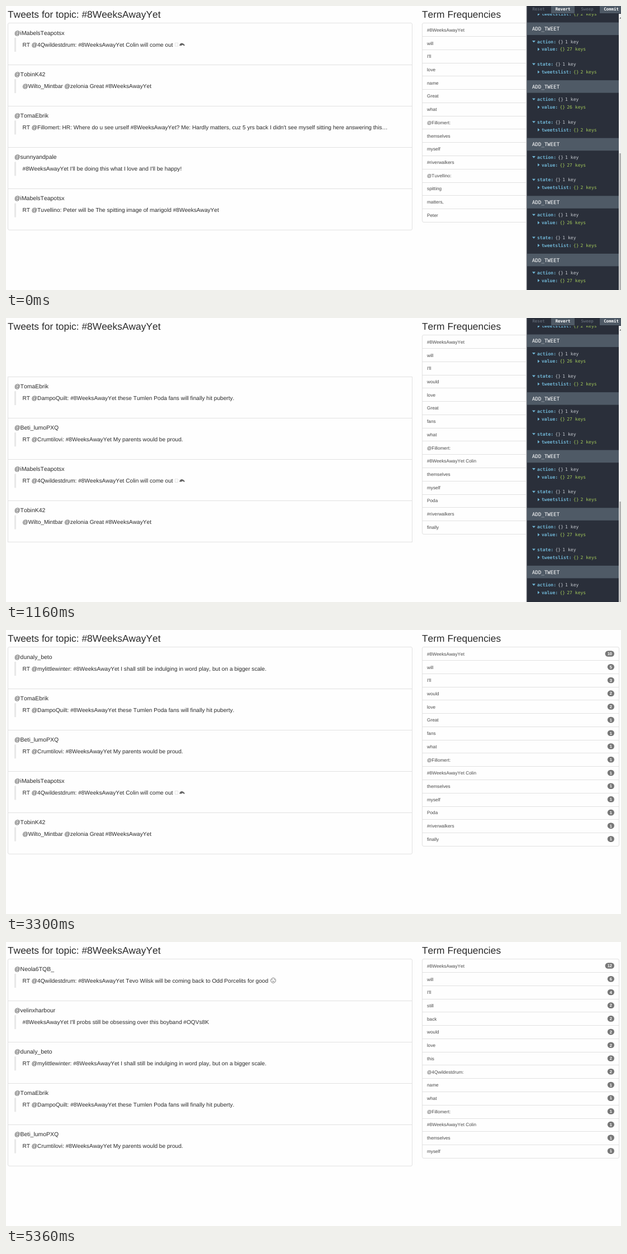
Write an HTML page that moves like this. It is 1100x509 px and loops after 8000 ms.

```html
<!DOCTYPE html>
<html lang="en">
<head>
<meta charset="utf-8">
<title>Topic stream</title>
<style>
  html, body { margin: 0; width: 100%; height: 100%; overflow: hidden; background: #fefefe; }
  svg { display: block; width: 1100px; height: 509px; }
  text { font-family: "Liberation Sans", Arial, sans-serif; font-kerning: none; fill: #2a2a2a; text-rendering: geometricPrecision; white-space: pre; }
  .title { font-size: 17.4px; }
  .user { font-size: 10.44px; }
  .body { font-size: 10.15px; }
  .term { font-size: 8.25px; fill: #484848; }
  .count { font-size: 7.5px; font-weight: bold; fill: #fff; text-anchor: middle; }
  .line { fill: none; stroke: #e1e1e1; }
  .log text { font-family: "DejaVu Sans Mono", monospace; font-size: 8.08px; }
  .log .head { font-size: 9.1px; fill: #fff; }
  .log .label { fill: #6fb3d2; font-weight: bold; }
  .log .open { fill: #c4c8ce; }
  .log .shut { fill: #a1c659; }
  .log .button { font-size: 7.4px; font-weight: bold; fill: #fff; text-anchor: middle; }
  .log .off { fill: #5a626e; }
</style>
</head>
<body>
<svg viewBox="0 0 1100 509">
  <text class="title" x="3" y="21" id="topic"></text>
  <text class="title" x="744" y="21">Term Frequencies</text>
  <g id="posts"></g>
  <g id="terms"></g>
  <g id="log" class="log"></g>
  <path id="cursor" d="M0 0V9.5L2.2 7.6L3.8 11L5.2 10.4L3.8 7H6.6Z" fill="#fff" stroke="#333" stroke-width=".8"/>
</svg>
<script>
const LOOP = 8000;
const TAG = "#8WeeksAwayYet";
const $ = id => document.getElementById(id);
const range = (n, draw) => Array.from({ length: n }, (_, i) => draw(i)).join("");
const label = (cls, x, y, s) => `<text class="${cls}" x="${x}" y="${y}">${s}</text>`;
const box = (x, y, w, h, fill) => `<rect x="${x}" y="${y}" width="${w}" height="${h}" fill="${fill}"/>`;

// Newest first: [user, message, icon]
const posts = [
  ["@Neola6TQB_", `RT @4Qwildestdrum: ${TAG} Tevo Wilsk will be coming back to Odd Porcelits for good`, "face"],
  ["@velinxharbour", `${TAG} I'll probs still be obsessing over this boyband #OQVs8K`],
  ["@dunaly_beto", `RT @mylittlewinter: ${TAG} I shall still be indulging in word play, but on a bigger scale.`],
  ["@TomaEbrik", `RT @DampoQuilt: ${TAG} these Tumlen Poda fans will finally hit puberty.`],
  ["@Beti_lumoPXQ", `RT @Crumtilovi: ${TAG} My parents would be proud.`],
  ["@iMabelsTeapotsx", `RT @4Qwildestdrum: ${TAG} Colin will come out`, "arch"],
  ["@TobinK42", `@Wilto_Mintbar @zelonia Great ${TAG}`],
  ["@TomaEbrik", `RT @Fillomert: HR: Where do u see urself ${TAG}? Me: Hardly matters, cuz 5 yrs back I didn't see myself sitting here answering this…`],
  ["@sunnyandpale", `${TAG} I'll be doing this what I love and I'll be happy!`],
  ["@iMabelsTeapotsx", `RT @Tuvellino: Peter will be The spitting image of marigold ${TAG}`]
];

const icons = {
  arch: `<rect x="302.5" y="-6.5" width="5" height="6" fill="none" stroke="#e4e4e4"/>
    <path d="M310 -1.5Q311 -6 314.5 -6Q318.5 -5.5 320 -1.5H317.5Q316 -4 314 -1.5Z" fill="#666"/>`,
  face: `<g fill="none" stroke="#555" stroke-width=".8"><circle cx="478" cy="-3.7" r="4.4"/>
    <path d="M475.4 -5.2H477M479 -5.2H480.6M476 -1.8Q478 -2.6 480 -1.8"/></g>`
};

const ranking = (names, counts) => ({ names: [TAG, "will", "I'll", ...names.split("|")], counts });
const latest = `@Fillomert:|${TAG} Colin|themselves|myself`;
const rankings = [
  ranking("love|name|Great|what|@Fillomert:|themselves|myself|#riverwalkers|@Tuvellino:|spitting|matters,|Peter", [8, 5, 3]),
  ranking(`would|love|name|what|${latest}|#riverwalkers|@Tuvellino:|spitting|matters,`, [8, 5, 3, 2, 2]),
  ranking(`would|love|Great|fans|what|${latest}|Poda|#riverwalkers|finally`, [10, 5, 3, 2, 2]),
  ranking(`still|would|love|this|name|what|${latest}|Poda|#riverwalkers`, [11, 5, 4, 2, 2, 2, 2]),
  ranking(`still|back|would|love|this|@4Qwildestdrum:|name|what|${latest}`, [12, 6, 4, 2, 2, 2, 2, 2, 2])
];

const logs = [[27, 26, 27, 26, 27], [26, 27, 26, 27, 27], [26, 27, 27, 27, 27]];

// [start, newest post, its opacity, ranking, log, scroll thumb]; no log hides the panel
const states = [
  [0, 5, 1, 0, 0, 264],
  [500, 4, 0, 1, 1, 290],
  [640, 4, 1, 1, 1, 290],
  [760, 3, 1, 2, 2, 290],
  [1160, 2, 0, 2, 2, 329],
  [1450, 2, 1, 2, 2, 329],
  [2870, 2, 1, 2],
  [4850, 1, 0, 3],
  [4990, 1, .5, 3],
  [5110, 1, 1, 3],
  [5240, 0, 0, 4],
  [5360, 0, 1, 4]
];

// [start, x, y]; no position hides the pointer
const pointer = [[0], [1970, 920, 507], [2090, 920, 503], [2210, 920, 500], [3150, 958.5, 504], [3300], [4700, 1070, 501], [4850]];

function panel(x, width, first, count, pitch) {
  const edge = i => Math.round(30.4 + pitch * i) + .5;
  const top = edge(first);
  return `<rect class="line" x="${x}" y="${top}" width="${width}" height="${edge(count) - top}" rx="${first ? 0 : 2.5}"/>` +
    range(count - first - 1, i => `<path class="line" d="M${x} ${edge(first + i + 1)}h${width}"/>`);
}

function drawPosts(newest, opacity) {
  const pitch = 74.15;
  return panel(3.5, 723, opacity ? 0 : 1, 5, pitch) + range(5, i => {
    const [user, message, icon] = posts[newest + i];
    return `<g transform="translate(0 ${pitch * i})" opacity="${i ? 1 : opacity}">` +
      box(15, 57, 3, 25, "#e8e8e8") + label("user", 15, 51.6, user) + label("body", 29.5, 72.6, message) +
      (icon ? `<g transform="translate(0 72.6)">${icons[icon]}</g>` : "") + "</g>";
  });
}

function drawTerms({ names, counts }) {
  return panel(744.5, 352, 0, 15, 23.76) + range(15, i => {
    const y = 42.6 + 23.72 * i, count = counts[i] || 1;
    const width = count > 9 ? 16.4 : 12.2;
    return label("term", 753, y + 3.2, names[i]) +
      `<rect x="${1088 - width}" y="${y - 5.4}" width="${width}" height="10.6" rx="5.3" fill="#777"/>` +
      label("count", 1088 - width / 2, y + 2.6, count);
  });
}

function node(x, y, name, size, open) {
  const brace = x + (name.length + 1) * 4.865 + 3.3, kind = open ? "open" : "shut";
  const arrow = open ? `M${x - 9} ${y - 4.6}h6l-3 3.6z` : `M${x - 7} ${y - 5.6}v5.6l3.6 -2.8z`;
  return `<path d="${arrow}" fill="#6fb3d2"/>` + label("label", x, y, name + ":") +
    label(kind, brace, y, "{}") + label(kind, brace + 12.7, y, size);
}

function drawLog(keys, thumb) {
  const entry = i => `<g transform="translate(0 ${103.6 * i})">` +
    box(932, 29.5, 164, 22.5, "#4f5a66") + label("head", 941, 44.3, "ADD_TWEET") +
    node(950, 66.5, "action", "1 key", true) + node(958, 80.4, "value", keys[i] + " keys") +
    node(950, 107.2, "state", "1 key", true) + node(958, 121.1, "tweetslist", "2 keys") + "</g>";
  const button = (x, s, on) => label(on ? "button" : "button off", x, 8.3, s);
  return box(930, 0, 1, 509, "#d8d8da") + box(931, 0, 1, 509, "#777b82") + box(932, 0, 168, 509, "#2a2f3a") +
    range(6, i => entry(i - 1)) +
    box(1096, 14, 4, 495, "#f1f1f1") + box(1097, thumb, 3, 509 - thumb, "#b4b4b4") +
    `<path d="M1097 22.5h3v-2.5z" fill="#666"/>` +
    box(932, 0, 168, 14, "#2a2f3a") + box(975, 0, 42, 13, "#4f5a66") + box(1062, 0, 38, 13, "#4f5a66") +
    button(952.5, "Reset") + button(996, "Revert", true) + button(1039.5, "Sweep") + button(1082.5, "Commit", true);
}

const at = (list, time) => list.findLast(([start]) => start <= time);
const startTime = performance.now();
let shown;

function frame() {
  const time = (performance.now() - startTime) % LOOP;
  const state = at(states, time);
  if (state !== shown) {
    const [, newest, opacity, rank, log, thumb] = shown = state;
    $("posts").innerHTML = drawPosts(newest, opacity);
    $("terms").innerHTML = drawTerms(rankings[rank]);
    $("log").innerHTML = log === undefined ? "" : drawLog(logs[log], thumb);
  }
  const [, x, y] = at(pointer, time);
  $("cursor").setAttribute("transform", `translate(${x ?? -50} ${y ?? -50})`);
  requestAnimationFrame(frame);
}

$("topic").textContent = `Tweets for topic: ${TAG}`;
frame();
</script>
</body>
</html>
```
